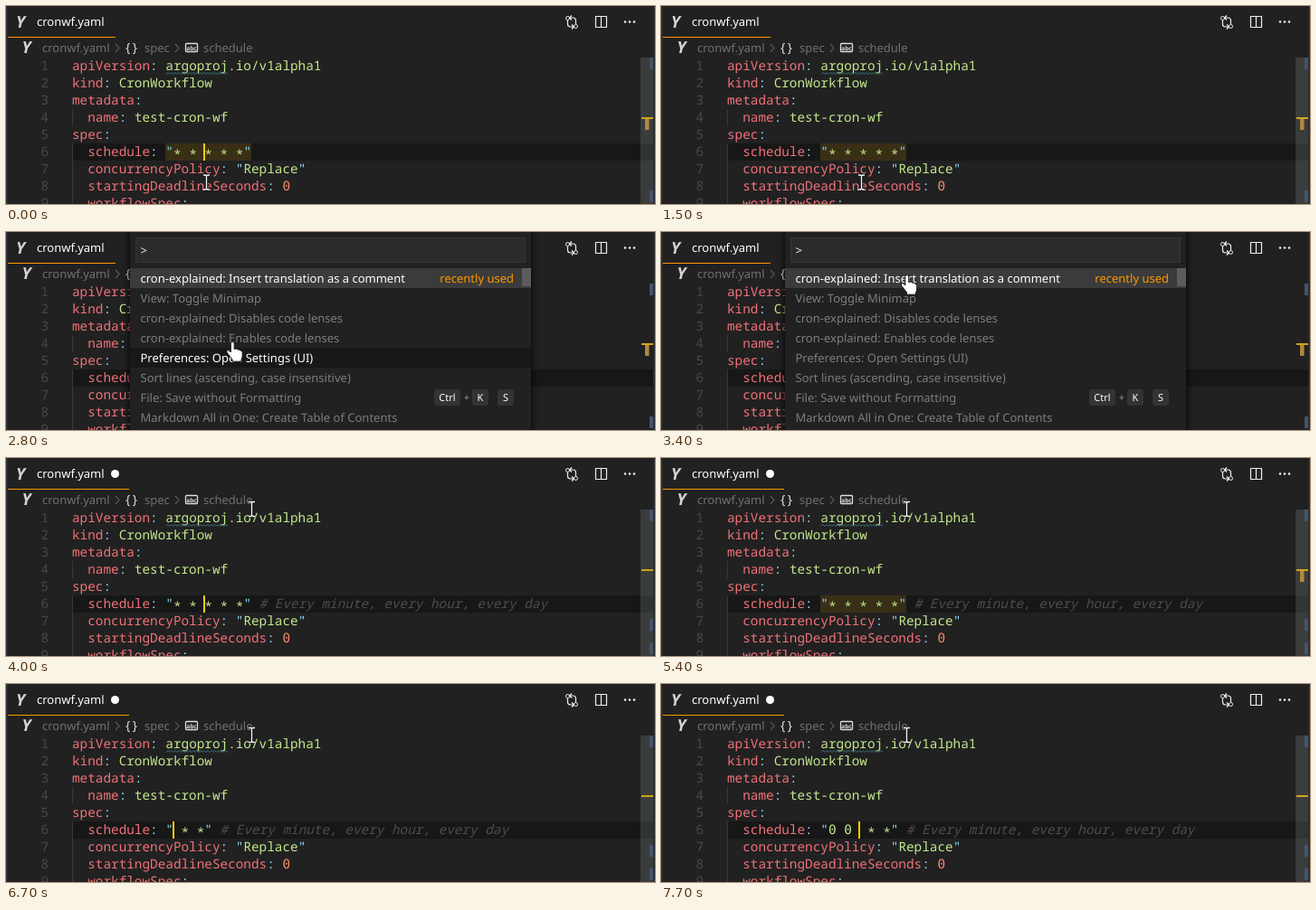
Animation of 717x219 px, one loop 8000 ms. Source, as an HTML page:

```html
<!DOCTYPE html>
<html lang="en">
<head>
<meta charset="utf-8">
<title>Cron editor</title>
<style>
  html, body { margin: 0; width: 717px; height: 219px; overflow: hidden; background: #212121; }
  svg { display: block; }
  text { white-space: pre; text-rendering: geometricPrecision; font: 13px "Noto Sans", "Open Sans", sans-serif; }
  .code { font: 500 14.35px "Noto Sans Mono", "DejaVu Sans Mono", monospace; }
  .zero { font-family: "DejaVu Sans Mono", monospace; }
  .comment { font-style: italic; }
  .file { font-weight: 700; font-style: italic; font-size: 18px; }
  .key { font-size: 11px; text-anchor: middle; }
</style>
</head>
<body>
<svg id="stage" width="717" height="219" viewBox="0 0 717 219"></svg>
<script>
const LOOP = 8000;
const LEFT = 73, ADVANCE = 8.61, TOP = 57, LINE = 19;
const C = {
  key: '#f07178', string: '#c3e88d', punct: '#89ddff', number: '#f78c6c',
  comment: '#4d4d4d', gutter: '#484848', accent: '#ff9800', caret: '#ffcc00',
  border: '#30353a', guide: '#383838'
};

const colX = col => LEFT + col * ADVANCE;
const lineY = n => TOP + (n - 1) * LINE;
const rect = (x, y, w, h, fill, extra = '') =>
  `<rect x="${x}" y="${y}" width="${w}" height="${h}" fill="${fill}" ${extra}/>`;
const path = (d, stroke, width = 1, fill = 'none') =>
  `<path d="${d}" stroke="${stroke}" stroke-width="${width}" fill="${fill}" stroke-linejoin="round"/>`;
const label = (x, y, str, fill, extra = '') =>
  `<text x="${x}" y="${y}" fill="${fill}" ${extra}>${str}</text>`;
const code = (col, n, str, fill, cls = '', drop = 0) =>
  label(colX(col).toFixed(2), lineY(n) + 14 + drop, str, fill, `class="code ${cls}"`);

// One "key: value" row; the value may be quoted, numeric or bare.
function entry(n, indent, key, value = '', kind = 'string') {
  const colon = indent + key.length, start = colon + 2;
  let out = code(indent, n, key, C.key) + code(colon, n, ':', C.punct);
  if (kind === 'quoted') {
    out += code(start, n, '"', C.punct) + code(start + 1, n, value, C.string) +
      code(start + 1 + value.length, n, '"', C.punct);
  } else if (value) {
    out += code(start, n, value, C[kind], kind === 'number' ? 'zero' : '');
  }
  return out;
}

function squiggle(x0, x1, y) {
  let d = `M${x0} ${y}`;
  for (let x = x0, up = true; x < x1; x += 2, up = !up) d += `l2 ${up ? -2 : 2}`;
  return path(d, '#42808c', 0.9);
}

function header() {
  const chevron = x => path(`M${x} 42l4 4.5l-4 4.5`, '#777');
  return rect(0, 0, 1.5, 219, C.border) + rect(715.5, 0, 1.5, 219, C.border) +
    label(11, 24, 'Y', '#d4d4d4', 'class="file"') +
    label(34, 22, 'cronwf.yaml', '#fff') +
    rect(2, 34, 119, 1, C.accent, 'id="tabLine"') +
    label(17.5, 52, 'Y', '#d4d4d4', 'class="file"') +
    label(40, 51, 'cronwf.yaml', '#707070') + chevron(121) +
    label(132, 51, '{}', '#ddd', 'style="font-size:14px;letter-spacing:2.5px"') +
    label(153, 51, 'spec', '#707070') + chevron(187) +
    rect(198.5, 41.5, 13, 9, 'none', 'stroke="#ddd" stroke-width="1.3" rx="1"') +
    label(205, 48.5, 'abc', '#ddd', 'style="font-size:6.5px;font-weight:700;text-anchor:middle"') +
    label(218, 51, 'schedule', '#707070') +
    path('M620.5 16v4q0 3 3 3h4m-2.5-2.5l2.5 2.5l-2.5 2.5M629.5 20v-4q0-3-3-3h-4m2.5-2.5l-2.5 2.5l2.5 2.5', '#eee', 1.2) +
    '<circle cx="620.5" cy="13.5" r="2" fill="none" stroke="#eee"/>' +
    '<circle cx="629.5" cy="22.5" r="2" fill="none" stroke="#eee"/>' +
    path('M651.5 11.5h12v12h-12zM657.5 11.5v12', '#eee', 1.2) +
    [684, 689, 694].map(x => `<circle cx="${x}" cy="17.5" r="1.3" fill="#eee"/>`).join('');
}

function editor() {
  let out = rect(74, lineY(6), 641, LINE, '#171717') + rect(73, lineY(4), 1, LINE, C.guide) +
    rect(73, lineY(6), 1, 80, C.guide);
  for (let n = 1; n <= 9; n++)
    out += label(47, lineY(n) + 14, n, C.gutter, 'class="code" text-anchor="end"');
  return out + entry(1, 0, 'apiVersion', 'argoproj.io/v1alpha1') + squiggle(177, 245, 75.5) +
    entry(2, 0, 'kind', 'CronWorkflow') +
    entry(3, 0, 'metadata') +
    entry(4, 2, 'name', 'test-cron-wf') +
    entry(5, 0, 'spec') +
    '<g id="schedule"></g>' +
    entry(7, 2, 'concurrencyPolicy', 'Replace', 'quoted') +
    entry(8, 2, 'startingDeadlineSeconds', '0', 'number') +
    entry(9, 2, 'workflowSpec');
}

function ruler() {
  const mark = (y, id = '') => rect(711, y, 4, 13, '#44546a', id);
  return rect(701, TOP, 14, 162, '#eeffff', 'id="thumb"') +
    mark(57) + mark(204) + mark(178, 'id="newMark"') +
    rect(702, 123, 13, 2, '#d0a515') +
    rect(706, 125, 4.5, 12, '#b08a3c', 'id="stem"');
}

const COMMANDS = [
  'cron-explained: Insert translation as a comment',
  'View: Toggle Minimap',
  'cron-explained: Disables code lenses',
  'cron-explained: Enables code lenses',
  'Preferences: Open Settings (UI)',
  'Sort lines (ascending, case insensitive)',
  'File: Save without Formatting',
  'Markdown All in One: Create Table of Contents'
];

function paletteRows(hover) {
  const keycap = (x, w, str) => rect(x, 174, w, 18, '#333', 'rx="3"') +
    label(x + w / 2, 187, str, '#fff', 'class="key"');
  return COMMANDS.map((name, i) => {
    const y = 40 + 22 * i, lit = i === 0 || i === hover;
    return (lit ? rect(137, y, 443, 22, i ? '#181818' : '#3b3b3b') : '') +
      label(148.5, y + 16, name, lit ? '#fff' : '#7d7d7d');
  }).join('') +
    label(561, 56, 'recently used', C.accent, 'text-anchor="end"') +
    keycap(473, 29, 'Ctrl') + label(509, 187, '+', '#999', 'class="key"') +
    keycap(515, 18, 'K') + keycap(543, 18, 'S') +
    rect(570, 40, 10, 20, '#5c5c5c');
}

const palette = () =>
  rect(137, -10, 443, 240, '#212121', 'style="filter:drop-shadow(0 0 4px #000)"') +
  rect(143.5, 6.5, 430, 27, '#2b2b2b', 'stroke="#363636"') +
  label(148.5, 25, '&gt;', '#eee') + '<g id="rows"></g>';

const ibeam = () => {
  const d = 'M-3.5-8h2.5l1 1l1-1h2.5M0-7v14M-3.5 8h2.5l1-1l1 1h2.5';
  return path(d, '#111', 3) + path(d, '#fff', 1.3);
};
const hand = () => path('M-1.7 1.5q0-2 1.9-2t2 2v6q3-1.2 4 .7q2.2-.6 3 1q2-.3 2 2.2v3.6q0 2-1.2 4v2.2H0v-2.2l-5.7-7.4q-1.2-2.2.6-3q1.5-.2 3.4 2.4z', '#111', 1, '#fff');

document.getElementById('stage').innerHTML =
  header() + '<circle id="dirty" cx="120.5" cy="17.5" r="4.5" fill="#fff"/>' +
  editor() + ruler() +
  `<g id="palette">${palette()}</g>` +
  `<g id="ibeam">${ibeam()}</g><g id="hand">${hand()}</g>`;

const el = id => document.getElementById(id);
const show = (id, on) => el(id).setAttribute('display', on ? 'inline' : 'none');

const EVERY = '* * * * *';
// time, cron expression, caret index, caret visible
const EDITS = [
  [0, EVERY, 4, 1], [400, EVERY, 4, 0], [1000, EVERY, 4, 1], [1500, EVERY, 4, 0],
  [2000, EVERY, 4, 1], [2100, EVERY, 4, 0], [3800, EVERY, 4, 1],
  [4500, EVERY, 4, 0], [4800, EVERY, 4, 1], [5400, EVERY, 4, 0], [5600, EVERY, 5, 1],
  [5900, '* *  * *', 4, 1], [6200, '* * * *', 3, 1], [6400, '*  * *', 2, 1],
  [6500, '* * *', 1, 1], [6700, ' * *', 0, 1], [7200, ' * *', 0, 0],
  [7300, '0 * *', 1, 1], [7400, '0  * *', 2, 1], [7600, '0 0 * *', 3, 1], [7700, '0 0  * *', 4, 1]
];
// time, pointer x, pointer y
const POINTER = [
  [0, 221.5, 195], [2800, 250, 122], [2900, 261, 84], [3000, 268, 45], [3100, 271, 21],
  [3200, 271, 25], [3300, 271, 38], [3400, 271.5, 48], [3500, 271.5, 56.5]
];
const PALETTE_OPEN = 2100, PALETTE_CLOSE = 3800, COMMENTED = 3900;

const latest = (steps, t) => steps.filter(s => s[0] <= t).pop();
const clamp = v => Math.max(0, Math.min(1, v));
const cache = {};
function setMarkup(id, html) {
  if (cache[id] !== html) el(id).innerHTML = cache[id] = html;
}

function scheduleRow(t, highlighted) {
  const [, cron, index, caretOn] = latest(EDITS, t);
  const end = 13 + cron.length;
  let out = highlighted ? rect(176, lineY(6), 95, LINE, '#392f16') : '';
  out += entry(6, 2, 'schedule') + code(12, 6, '"', C.punct);
  [...cron].forEach((ch, i) => {
    if (ch !== ' ') out += code(13 + i, 6, ch, C.string, ch === '0' ? 'zero' : '', ch === '*' ? 2.5 : 0);
  });
  out += code(end, 6, '"', C.punct);
  if (t >= COMMENTED)
    out += code(end + 2, 6, '# Every minute, every hour, every day', C.comment, 'comment');
  if (caretOn) out += rect(Math.floor(colX(13 + index) - 0.5), lineY(6), 2, LINE, C.caret);
  return out;
}

function render(t) {
  const open = t >= PALETTE_OPEN && t < PALETTE_CLOSE;
  const dirty = t >= COMMENTED;
  const highlighted = !dirty || (t >= 4100 && t < 5900);
  const [, x, y] = latest(POINTER, t);
  const overList = open && y > 40;

  setMarkup('schedule', scheduleRow(t, highlighted));
  show('stem', highlighted);
  show('dirty', dirty);
  show('newMark', dirty);
  el('tabLine').setAttribute('width', dirty ? 134 : 119);
  show('palette', open);
  if (open) {
    // The hovered row trails the pointer by one step.
    const before = latest(POINTER, t - 100)[2];
    const hover = t >= 2800 && t < 2900 ? 4 : Math.floor((before - 40) / 22);
    setMarkup('rows', paletteRows(hover));
  }
  const thumb = t < PALETTE_CLOSE ? 1 - (t - PALETTE_OPEN) / 300 : (t - PALETTE_CLOSE + 100) / 200;
  el('thumb').setAttribute('opacity', 0.125 * clamp(thumb));

  show('hand', overList);
  show('ibeam', !overList);
  el(overList ? 'hand' : 'ibeam').setAttribute('transform', `translate(${x} ${y})`);
}

const began = performance.now();
function tick() {
  render((performance.now() - began) % LOOP);
  requestAnimationFrame(tick);
}
tick();
</script>
</body>
</html>
```
